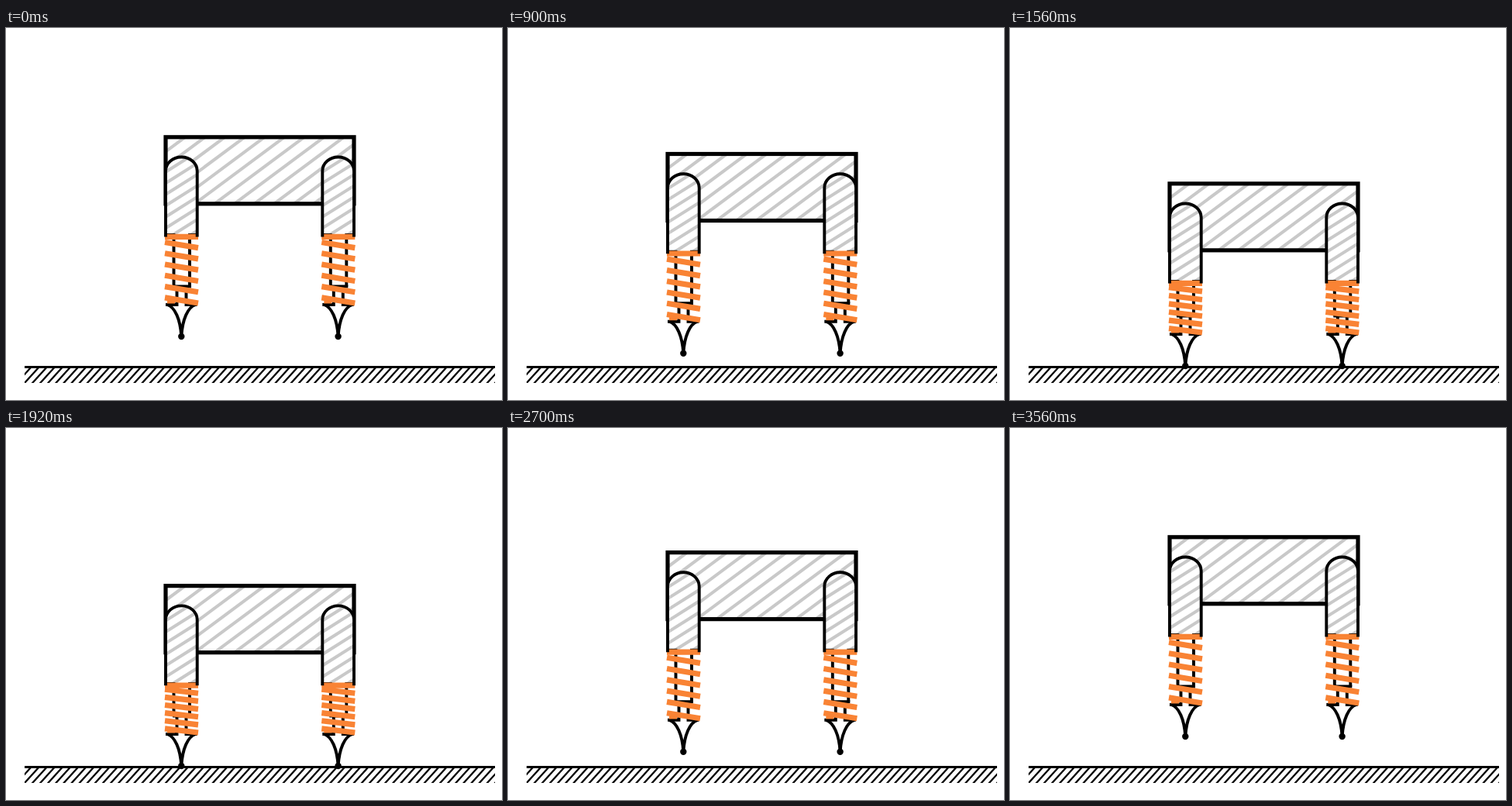
An HTML page that plays this animation: 640x480 px, repeating every 3.58 s.

```html
<!DOCTYPE html>
<html lang="en">
<head>
<meta charset="utf-8">
<title>Bouncing hopper</title>
<style>
  html, body { margin: 0; width: 100%; height: 100%; overflow: hidden; background: #fff; }
  svg { display: block; width: 640px; height: 480px; }
  path, rect, circle { fill: none; }
  .ink { stroke: #000; stroke-width: 3.9; }
  .gray { stroke: #c9c9c9; stroke-width: 4.1; }
  .coil { stroke: #f98334; stroke-width: 7.2; }
  .tools { stroke: #808080; stroke-width: 1.2; stroke-linejoin: round; animation: tools 3580ms step-end infinite; }
  .tools .solid { fill: #808080; stroke: none; }
  @keyframes tools {
    0% { visibility: hidden; }
    7.82% { visibility: visible; }
    23.74%, 100% { visibility: hidden; }
  }
</style>
</head>
<body>
<svg viewBox="0 0 640 480">
  <defs>
    <clipPath id="inBody"><rect x="206" y="140.8" width="243" height="86"/></clipPath>
    <clipPath id="inSleeve"><path d="M206 267V184.500A20.350 18 0 0 1 246.700 184.500V267Z"/></clipPath>
    <clipPath id="inGround"><rect x="24" y="437" width="607" height="21"/></clipPath>
  </defs>

  <path id="groundHatch" clip-path="url(#inGround)" stroke="#000" stroke-width="2.3"/>
  <path d="M24 437.500H631" stroke="#000" stroke-width="3"/>

  <g id="body">
    <path id="bodyHatch" class="gray" clip-path="url(#inBody)"/>
    <rect x="206" y="140.8" width="243" height="86" stroke="#000" stroke-width="5.2"/>
  </g>

  <g id="leg">
    <g id="sleeve">
      <path d="M206 267V184.500A20.350 18 0 0 1 246.700 184.500V267Z" style="fill:#fff"/>
      <path id="sleeveHatch" class="gray" clip-path="url(#inSleeve)"/>
    </g>
    <path id="tube" class="ink"/>
    <g id="foot">
      <path class="ink" d="M215 333.500H239M206 357H220.500V333.500M246.500 357H232.500V333.500"/>
      <path class="ink" d="M208 357C218 360 225 376 226.300 398C227.600 376 234.600 360 244.600 357"/>
      <circle cx="226.300" cy="398" r="4.200" style="fill:#000"/>
    </g>
    <path id="coil" class="coil"/>
    <path id="shell" class="ink" d="M206 269.500V184.500A20.350 18 0 0 1 246.700 184.500V269.500"/>
  </g>
  <use href="#leg" x="202.3"/>

  <g class="tools">
    <path d="M514 11V16.500H524V13.500M516 13C516 9 519 7.500 523 7.500"/>
    <path class="solid" d="M521.500 4L526.500 7.500L521.500 11ZM525 18H529V14Z"/>
    <path d="M537 4.500H548.500V17.500H537V14L534 11L537 8ZM539.500 8.500H546M539.500 11H546M539.500 13.500H546"/>
    <path d="M557.500 18C556 15 554 12.500 553.500 11C554 9.800 555.500 10.200 557 12.500L556 6C556.500 4.800 558 5 558.300 6L559.300 10V4.500C560 3.300 561.300 3.500 561.500 4.500V10L563 5C563.800 4 565 4.500 565 5.500L564.500 10.500L566.500 7.500C567.500 6.800 568.500 7.500 568 8.500C566.500 12 567 15 564.500 18Z"/>
    <circle cx="579.500" cy="9.500" r="5.800"/>
    <path d="M576.500 9.500H582.500M579.500 6.500V12.500"/>
    <path d="M584 14L588.500 18.500" stroke-width="2"/>
    <circle cx="599.500" cy="9.500" r="5.800"/>
    <path d="M596.500 9.500H602.500"/>
    <path d="M604 14L608.500 18.500" stroke-width="2"/>
    <path d="M613 11.500L621 4L629 11.500M615.500 10V18H619.500V13H622.500V18H626.500V10"/>
  </g>
</svg>
<script>
const LOOP = 3580, STEP = 20, SPAN = 3.56;
const FALL = 26.8;          // half the gravity, px/s²
const DROP = 38;            // foot clearance, px
const OMEGA = 3.1;          // spring frequency, rad/s
const TURNS = 6;
const byId = id => document.getElementById(id);
const draw = (id, d) => byId(id).setAttribute('d', d);
const shift = (id, y) => byId(id).setAttribute('transform', `translate(0 ${y.toFixed(2)})`);

const lines = (n, line) => Array.from({ length: n }, (_, i) => line(i)).join('');

draw('groundHatch', lines(64, i => `M${2.4 + i * 607 / 60} 459.500l20 -22`));
draw('bodyHatch', lines(14, i => `M${237 + i * 25.6} 136.500l-140 104`));
draw('sleeveHatch', lines(8, i => `M204 ${187 + i * 14.5}l46 -29`));

const touchTime = Math.sqrt(DROP / FALL);
const touchSpeed = 2 * FALL * touchTime;

function squeeze(s) {
  const a = OMEGA * s;
  return 2 * FALL / OMEGA ** 2 * (1 - Math.cos(a)) + touchSpeed / OMEGA * Math.sin(a);
}

function pose(t) {
  const u = Math.min(t, SPAN - t);
  const footY = Math.min(FALL * u * u, DROP);
  const bodyY = footY + (u > touchTime ? squeeze(u - touchTime) : 0);
  for (const id of ['body', 'sleeve', 'shell']) shift(id, bodyY);
  shift('foot', footY);

  const top = 267 + bodyY, head = 333.5 + footY;
  draw('tube', `M206 ${top}H216.500V${head}M246.700 ${top}H237V${head}`);

  const y = 269.3 + bodyY, end = 355 + footY, pitch = (end - y) / TURNS;
  draw('coil', `M205 ${y}H248` +
    lines(TURNS, i => `M205 ${y + (i + 0.5) * pitch}L248 ${y + (i + 1) * pitch}`) +
    `M208 ${end - 3}H218`);
}

function tick(now) {
  const t = Math.floor(now % LOOP / STEP) * STEP;
  pose(t / 1000);
  requestAnimationFrame(tick);
}
pose(0);
requestAnimationFrame(tick);
</script>
</body>
</html>
```
